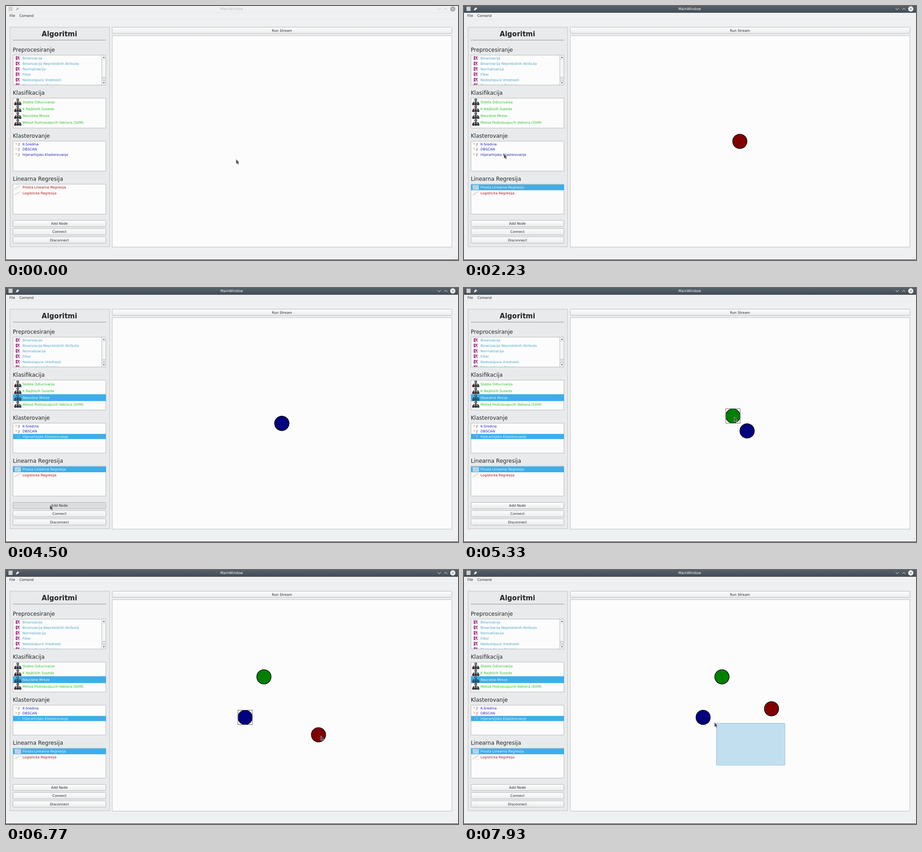
Recreate the animation shown at these times as an HTML page. Size 998x561 px, loop 8 s.

```html
<!DOCTYPE html>
<html lang="sr">
<head>
<meta charset="utf-8">
<title>MainWindow</title>
<style>
html, body { margin: 0; width: 100%; height: 100%; overflow: hidden; background: #eff0f1; }
svg { display: block; width: 998px; height: 561px; }
text { font: 7.57px "DejaVu Sans", sans-serif; fill: #232629; white-space: pre; }
.head { font-size: 12px; }
.big { font-size: 15px; font-weight: bold; }
.mid { text-anchor: middle; }
</style>
</head>
<body>
<svg id="stage" viewBox="0 0 998 561">
  <defs>
    <linearGradient id="bar" x2="0" y2="1"><stop stop-color="#566069"/><stop offset="1" stop-color="#434c54"/></linearGradient>
    <linearGradient id="btn" x2="0" y2="1"><stop stop-color="#fdfdfd"/><stop offset="1" stop-color="#ebeced"/></linearGradient>
    <clipPath id="clip"><rect x="16" y="109" width="195" height="65.5"/></clipPath>
    <g id="puzzle">
      <path d="M-4.500-4h4.200v2.500h-1.500v2.500h1.500v3h-4.200z" fill="#b23f92"/>
      <path d="M.5-3.500h4l-1.500 3.500 1.500 4h-3v-2.500l-2-1.500z" fill="#a84a94"/>
      <path d="M2-2l1.500 1.500M1 2l2.500 1.500" stroke="#f0dcea"/>
    </g>
    <g id="tree" stroke="#111" stroke-width="1.300">
      <path d="M0-3V3M-5.500 3V.3H5.500V3" fill="none"/>
      <rect x="-1.800" y="-6.500" width="3.600" height="3.400" fill="#eee"/>
      <rect x="-7" y="2.800" width="3.400" height="3.400" fill="#d22"/>
      <rect x="-1.700" y="2.800" width="3.400" height="3.400" fill="#33c"/>
      <rect x="3.600" y="2.800" width="3.400" height="3.400" fill="#2a6"/>
    </g>
    <g id="cluster">
      <circle cx="-3.500" cy="-1" r="1.500" fill="#f1b75c"/>
      <path d="M-5-3.500h1M-1.500 1.500h1M-4 2.500h1" stroke="#e5cf9f"/>
      <path d="M0-3h5v3l-2 4h-2z" fill="#dde1f2"/>
      <path d="M2-2.500l2 .5-1 2z" fill="#c0507c"/>
      <path d="M1 3.500l2-3" stroke="#5865b8"/>
    </g>
    <g id="line">
      <path d="M-7 4L7-4" stroke="#c49a9a" stroke-width=".7"/>
      <path d="M-6 2l8-4.500M-2 3l8-5" stroke="#a5a5a5" stroke-width=".7" stroke-dasharray="1 2"/>
      <path d="M-7 5H7" stroke="#ddd" stroke-width=".5"/>
    </g>
  </defs>
  <g id="ui"></g>
  <g id="nodes"></g>
  <rect id="band" fill="#c2dff0" stroke="#8abfdd" rx="1"/>
  <path id="cursor" d="M0 0V11L2.500 8.900 4.300 12.500 6 11.700 4.700 8.300H7.200Z" fill="#47494c" stroke="#e6e6e6" stroke-width=".6"/>
</svg>
<script>
const $ = id => document.getElementById(id);
const box = (x, y, w, h, fill, stroke = 'none', more = '') =>
  `<rect x="${x}" y="${y}" width="${w}" height="${h}" fill="${fill}" stroke="${stroke}" ${more}/>`;
const text = (x, y, s, more = '') => `<text x="${x}" y="${y}" ${more}>${s}</text>`;
const button = (x, y, w, s, id = '') =>
  box(x + .5, y + .5, w - 1, 14, 'url(#btn)', '#b2b5b7', `rx="1.5" id="${id}"`) +
  text(x + w / 2, y + 10.2, s, 'class="mid"');

// Sidebar lists: title, icon, text colour, first row centre, row height, rows
const groups = [
  ['Preprocesiranje', 'puzzle', '#4ba4c6', 115, 11.95, ['Binarizacija', 'Binarizacija Neprekidnih Atributa',
    'Normalizacija', 'Filter', 'Nedostajuce Vrednosti', 'Elementi van Granica']],
  ['Klasifikacija', 'tree', '#28c328', 212, 15.1, ['Stabla Odlucivanja', 'K Najblizih Suseda',
    'Neuralne Mreze', 'Metod Podrzavajucih Vektora (SVM)']],
  ['Klasterovanje', 'cluster', '#2323b9', 305.2, 11.4, ['K-Sredina', 'DBSCAN', 'Hijerarhijsko Klasterovanje']],
  ['Linearna Regresija', 'line', '#a81414', 400.6, 12.7, ['Prosta Linearna Regresija', 'Logisticka Regresija']]
];

// Rows that get selected: key, time selected, time the highlight settles
const picks = [['line0', 1370, 1430], ['cluster2', 2400, 3230], ['tree2', 3800, 4500]];
const presses = [[1430, 1570], [3230, 3300], [4500, 4570]];

function list([title, icon, color, top, step, rows], i) {
  const y = 108 + 95 * i;
  const items = rows.map((name, k) => {
    const cy = top + step * k, key = icon + k;
    const picked = picks.some(p => p[0] == key);
    return (picked ? box(15.5, cy - step / 2, 205.5, step, '#3daee9', 'none', `id="${key}"`) : '') +
      (picked && icon == 'line' ? box(19, cy - 5, 14, 10, '#b5d9ec', 'none', 'id="tint"') : '') +
      `<use href="#${icon}" id="${key}i" x="${icon == 'line' ? 25.5 : 26}" y="${cy}"/>` +
      text(36.5, cy + 2.8, name, `id="${key}t" style="fill:${color}"`);
  }).join('');
  return text(15, y - 6.6, title, 'class="head"') +
    box(15.5, y + .5, 205, 66, '#fcfcfc', '#b7babc') +
    `<g ${i ? '' : 'clip-path="url(#clip)"'}>${items}</g>`;
}

const scrollbar = box(211.5, 108.5, 9, 66, '#f4f5f5', '#b7babc') +
  box(211.5, 157.5, 9, 8, '#dfe1e2', '#c3c5c7') +
  '<path d="M212 117.500h8" stroke="#d5d7d8"/>' +
  '<path d="M213.800 114.500l2.300-2.800 2.300 2.800zM213.800 168.500l2.300 2.800 2.300-2.800z" fill="#4b4e51"/>';

$('ui').innerHTML =
  '<path d="M0 14.500H998M0 28.500H998" stroke="#e6e7e8"/>' +
  box(0, 0, 998, 15, 'url(#bar)', 'none', 'id="title"') +
  box(5.5, 1.5, 9, 9.5, '#d3d0cc') +
  `<g id="deco" fill="none">
    <path d="M22 9.500l2.300-2.300M23 5.500l3 3M24 6.500l2.300-2.300M25.300 7.600l2.300-2.300M25.500 3.200l3.200 3.200" stroke-width="1.400"/>
    <path d="M953 5l3.500 3.500L960 5M967.700 8.500L971.200 5l3.500 3.500"/>
  </g>
  <circle id="close" cx="986.500" cy="6.500" r="5.700"/>
  <path id="cross" d="M984 4l5 5M989 4l-5 5"/>` +
  text(498.3, 9.3, 'MainWindow', 'id="caption" class="mid" style="font-size:7.9px"') +
  text(7.5, 24.3, 'File') + text(29.5, 24.3, 'Comand') +
  box(9, 46.8, 219.7, 485, '#e8eaeb', '#bcc0c2') +
  text(118, 67.3, 'Algoritmi', 'class="big mid"') +
  '<path d="M15 75.300H221" stroke="#8d9093"/>' +
  groups.map(list).join('') + scrollbar +
  button(15, 473, 206, 'Add Node', 'add') + button(15, 491.2, 206, 'Connect') + button(15, 509.4, 206, 'Disconnect') +
  button(234, 46.3, 751, 'Run Stream') +
  box(234.5, 65.5, 750, 467, '#fcfcfc', '#bbbec0') +
  '<path d="M989 558l7-7M993 558l3-3" stroke="#dcdedf"/>' +
  box(0, 560, 998, 1, '#33222f');

// Tracks of [time, x, y]
const pointer = [
  [300, 508, 338], [770, 103, 406], [1360, 103, 406], [1361, 83, 485], [1425, 83, 485], [1430, 83, 482],
  [1550, 83, 482], [2230, 88, 326], [2370, 88, 326], [2830, 92, 494], [3070, 91, 485], [3270, 91, 485],
  [3740, 128, 247], [3940, 128, 247], [4200, 86, 450], [4330, 97, 479], [4540, 97, 479], [5070, 612, 301],
  [5200, 612, 301], [5600, 553, 238], [5670, 553, 238], [5900, 689, 360], [6000, 673, 362], [6070, 673, 362],
  [6430, 530, 326], [6500, 530, 326], [6760, 695, 366], [6970, 695, 366], [7350, 684, 308], [7420, 684, 308],
  [7660, 713, 425], [7730, 708, 431], [7825, 708, 431], [7830, 640, 389], [7905, 640, 389], [7930, 553, 336]
];
const pair = [[5200, 609, 299], [5600, 671, 363.5]];
// colour, added, selected, deselected, track
const nodes = [
  ['#800000', 1570, 6900, 7730, [...pair, [6340, 671, 363.5], [6430, 690, 364], [6970, 690, 364], [7350, 679, 306.5]]],
  ['#000080', 3300, 6000, 6900, [...pair, [6070, 671, 363.5], [6430, 528, 325.5]]],
  ['#008000', 4570, 5230, 6000, [[5200, 609, 299], [5600, 550.5, 236], [6340, 550.5, 236], [6430, 569.5, 236]]]
];

$('nodes').innerHTML = nodes.map(([color]) =>
  `<g><circle r="15.800" fill="${color}" stroke="#000" stroke-width="1.300"/>
  <g fill="none">${box(-16, -16, 32, 32, 'none', '#fff')}${box(-16, -16, 32, 32, 'none', '#000', 'stroke-dasharray="2 1.2"')}</g></g>`).join('');

function at(track, t) {
  const k = track.findIndex(p => p[0] > t);
  if (k == 0) return track[0].slice(1);
  if (k < 0) return track.at(-1).slice(1);
  const [a, b] = [track[k - 1], track[k]];
  const u = (t - a[0]) / (b[0] - a[0]), e = u * u * (3 - 2 * u);
  return [a[1] + (b[1] - a[1]) * e, a[2] + (b[2] - a[2]) * e];
}
const show = (el, on) => el.style.display = on ? '' : 'none';
const move = (el, p) => el.setAttribute('transform', `translate(${p})`);
const set = (id, attrs) => Object.entries(attrs).forEach(([k, v]) => $(id).setAttribute(k, v));

function draw(t) {
  const tick = Math.floor((t + 4) * .03) / .03; // 30 updates a second
  const active = t >= 1370;
  show($('title'), active);
  set('deco', { stroke: active ? '#fcfcfc' : '#b9bbbd' });
  set('close', { fill: active ? '#fcfcfc' : '#a3a6a8' });
  set('cross', { stroke: active ? '#475057' : '#eff0f1' });
  $('caption').style.fill = active ? '#fcfcfc' : '#bcbec0';

  for (const [key, from, settled] of picks) {
    const on = t >= from, color = groups.find(g => key.startsWith(g[1]))[2];
    show($(key), on);
    set(key, { fill: t < settled ? '#47b4ec' : '#3daee9' });
    $(key + 't').style.fill = on ? '#eff5f9' : color;
    $(key + 'i').style.opacity = on ? (key == 'cluster2' ? .3 : .75) : 1;
  }
  show($('tint'), active);
  set('add', { fill: presses.some(([a, b]) => t >= a && t < b) ? '#dcdddf' : 'url(#btn)' });

  nodes.forEach(([, added, from, to, track], i) => {
    const g = $('nodes').children[i];
    show(g, t >= added);
    show(g.children[1], t >= from && t < to);
    move(g, at(track, tick));
  });

  const [x, y] = t < 7930 ? [644, 391.5] : [557.5, 338.5];
  show($('band'), t >= 7830);
  set('band', { x, y, width: 708.5 - x, height: 431 - y });
  move($('cursor'), at(pointer, tick));
}

const start = performance.now();
function loop() {
  draw((performance.now() - start) % 8000);
  requestAnimationFrame(loop);
}
loop();
</script>
</body>
</html>
```
